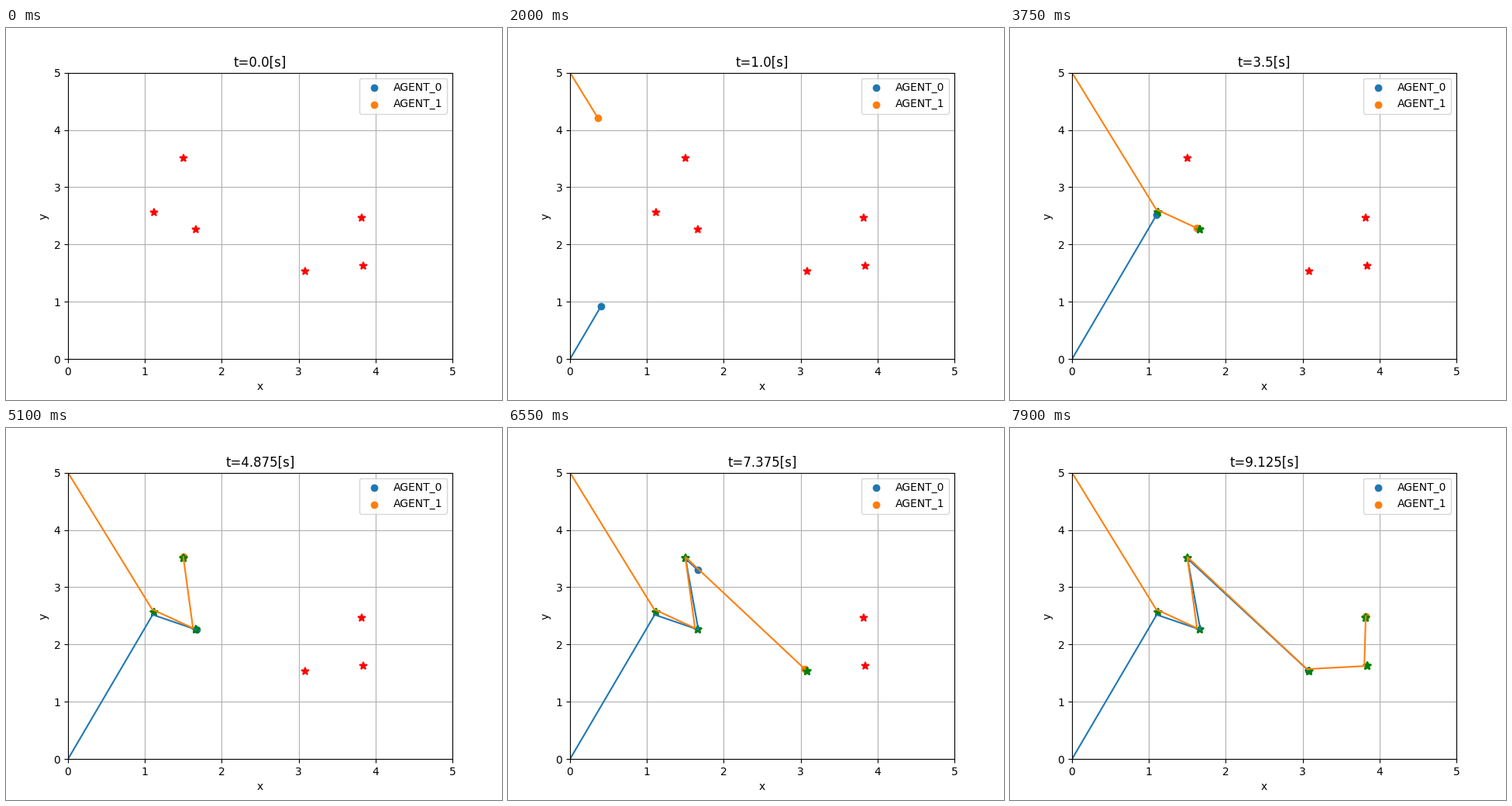
Animation, 640 px wide and 480 px high, one loop 8000 ms. Source, as a matplotlib script:

```python
import matplotlib.pyplot as plt
import numpy as np
from matplotlib.animation import FuncAnimation

FRAMES, INTERVAL = 160, 50
DT = 0.125        # simulated seconds per step, agents move at unit speed
PLAN_EVERY = 34   # the clock gains one planning step per this many frames

GOALS = np.array([(1.119, 2.56), (1.663, 2.262), (1.502, 3.507),
                  (3.085, 1.532), (3.841, 1.626), (3.82, 2.465)])


class Agent:
    """Walks from goal to goal in whole steps, setting off at given frames."""

    def __init__(self, name, color, home, starts):
        self.home = pos = np.array(home, float)
        self.legs = []
        for goal, first in zip(GOALS, starts):
            gap = goal - pos
            dist = np.hypot(*gap)
            steps, stride = round(dist / DT), gap / dist * DT
            self.legs.append((first, steps, stride))
            pos = pos + steps * stride
        self.dot = ax.scatter([], [], color=color, label=name)
        self.line, = ax.plot([], [], color=color)

    def steps_done(self, n):
        return [min(max(n - first + 1, 0), steps)
                for first, steps, _ in self.legs]

    def arrived(self, n):
        return [n >= first + steps - 1 for first, steps, _ in self.legs]

    def draw(self, n):
        moves = [k * leg[2] for k, leg in zip(self.steps_done(n), self.legs)]
        track = np.cumsum([self.home, *moves], axis=0)
        self.line.set_data(*track.T)
        self.dot.set_offsets(track[-1:] if n else np.empty((0, 2)))


fig, ax = plt.subplots(figsize=(6.4, 4.8), dpi=100)
ax.set(xlim=(0, 5), ylim=(0, 5), xlabel="x", ylabel="y")
ax.grid(True)
title = ax.set_title("t=0.0[s]")

follower = Agent("AGENT_0", "C0", (0, 0), [33, 79, 112, 130])
leader = Agent("AGENT_1", "C1", (0, 5), [34, 69, 85, 103, 133, 152])
stars = ax.scatter(*GOALS.T, s=44, marker="*", color="r")
ax.legend(loc="upper right")


def update(n):
    ticks = sum(leader.steps_done(n)) + n // PLAN_EVERY
    title.set_text(f"t={ticks * DT}[s]")
    for agent in (follower, leader):
        agent.draw(n)
    reached = leader.arrived(n)
    stars.set_color(["g" if r else "r" for r in reached])
    stars.set_linewidth([2 if r else 1.5 for r in reached])
    return []


anim = FuncAnimation(fig, update, frames=FRAMES, interval=INTERVAL,
                     init_func=lambda: update(0), repeat=True)
plt.show()
```
